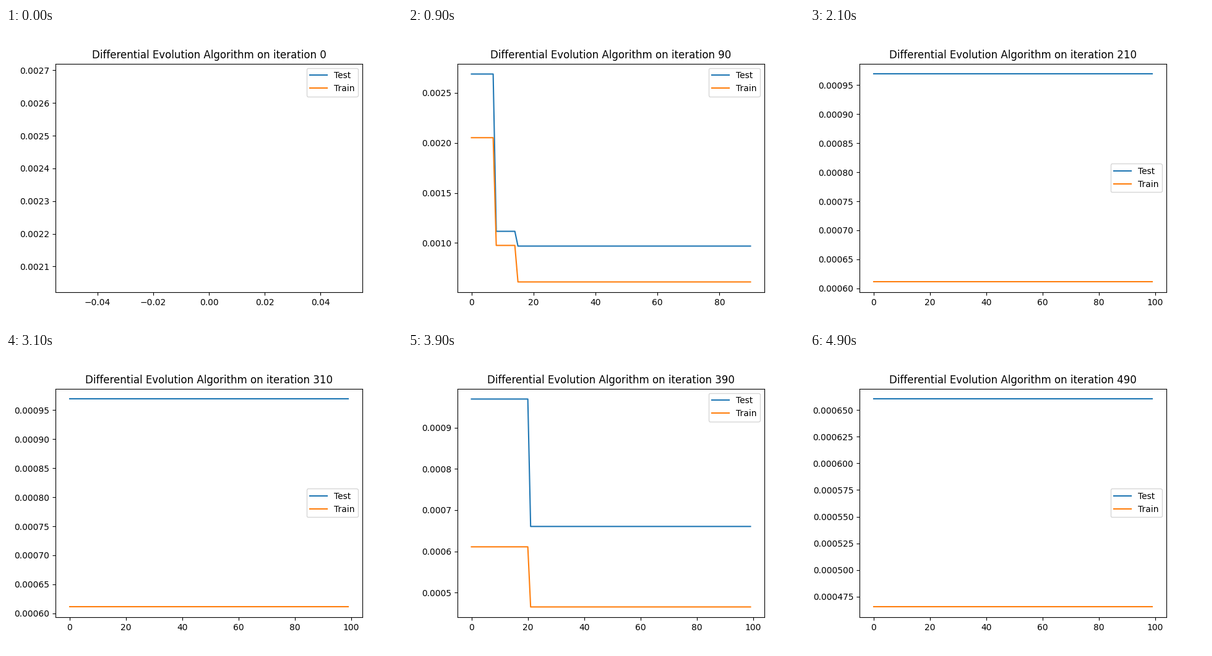
A matplotlib script for the animation above (5.91 s loop, 640 by 480 pixels).

```python
import numpy as np
import matplotlib.pyplot as plt
from matplotlib.animation import FuncAnimation

LOOP = 5910        # ms
INTERVAL = 30      # ms
STEP = 100         # ms per plotted iteration step
STRIDE = 10        # iterations per step
LAST = 490
WINDOW = 100       # most recent values kept in view

# Best score found so far: it drops at these iterations.
drops = [8, 15, 312]
stage = np.searchsorted(drops, np.arange(LAST + 1), side="right")
test = np.array([0.0026888, 0.001117, 0.0009693, 0.0006604])[stage]
train = np.array([0.0020527, 0.000976, 0.0006110, 0.0004653])[stage]

plt.rcParams["font.family"] = "DejaVu Sans"
fig, ax = plt.subplots(figsize=(6.4, 4.8), dpi=100)
curves = [(ax.plot([], [], label="Test")[0], test),
          (ax.plot([], [], label="Train")[0], train)]
ax.legend(loc="best")
title = ax.set_title("")


def update(i):
    # The small lead lets a tick that spans a step boundary show the new step.
    step = (i * INTERVAL + 20) // STEP
    n = min(step * STRIDE, LAST)
    start = max(0, n + 1 - WINDOW)
    for line, scores in curves:
        shown = scores[start:n + 1]
        line.set_data(np.arange(len(shown)), shown)
    ax.relim()
    ax.autoscale_view()
    title.set_text(f"Differential Evolution Algorithm on iteration {n}")
    return [line for line, _ in curves] + [title]


anim = FuncAnimation(fig, update, frames=LOOP // INTERVAL, interval=INTERVAL,
                     init_func=lambda: update(0), repeat=True, repeat_delay=0,
                     blit=False)
plt.show()
```
